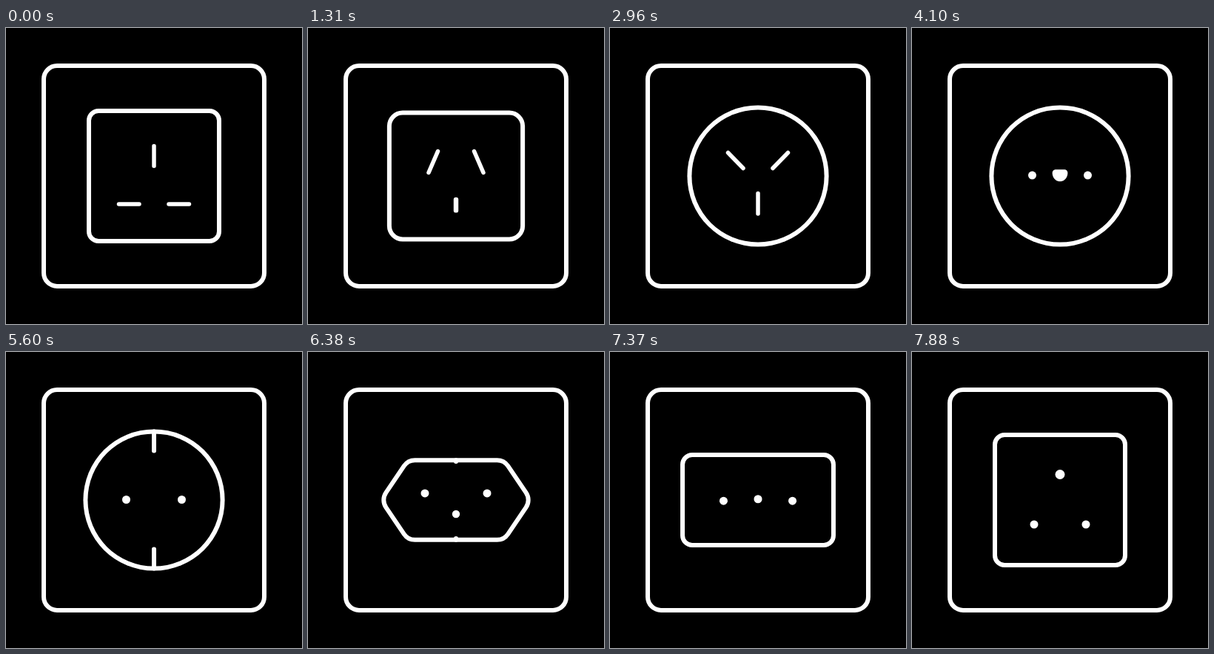
Write an HTML page with a canvas that moves like this. It is 400 by 400 pixels and loops after 8000 ms.

```html
<!DOCTYPE html>
<html lang="en">
<head>
<meta charset="utf-8">
<title>Wall sockets</title>
<style>
  html, body { margin: 0; width: 100%; height: 100%; overflow: hidden; background: #000; }
  canvas { display: block; }
</style>
</head>
<body>
<canvas id="stage" width="400" height="400"></canvas>
<script>
const ctx = document.getElementById('stage').getContext('2d');
const LOOP = 8000, MORPH = 590, TICK = 30, LINE = 6, BLADE = 5.5, HOLE = 11;

// Faces: half width, half height and half tip width of a hexagon core, then the rounding around it.
const rect = (w, h, r) => [w - r, h - r, w - r, r];
const square = rect(88, 88, 13);
const wide = rect(102.5, 71, 47);
const slab = rect(102.5, 60, 13);
const hex = [59, 38.5, 85, 13];
const round = [0.1, 0.1, 0.1, 92.5];

// Left pin (the right one mirrors it): two ends and a thickness.
const blade = (x1, y1, x2, y2) => [x1, y1, x2, y2, BLADE];
const hole = (x, y) => [x, y, x, y, HOLE];

// Earth contact: top, bottom, thickness, half width.
const slot = (y1, y2) => [y1, y2, BLADE, 0];
const dot = (y, w = HOLE) => [y, y, w, 0];

const sides = hole(162.5, 199.5);
const pose = (start, face, pin, earth, clip = 0) => ({ start, parts: [face, pin, earth, [clip]] });

const poses = [
  pose(-MORPH, square, blade(180, 238, 152.5, 238), slot(159.5, 186.5)),
  pose(490, square, blade(176.6, 166.5, 162, 195.5), slot(231.5, 248.5)),
  pose(1150, wide, blade(169, 167, 169, 195), dot(234, 12)),
  pose(1765, wide, blade(169, 185, 169, 214), dot(234, 0)),
  pose(2380, round, blade(159.5, 168.5, 180, 189.5), slot(223.5, 251)),
  pose(3090, round, hole(162.5, 198.5), [244, 261, BLADE, 14]),
  pose(3785, round, sides, dot(158.5)),
  pose(4490, round, sides, dot(158.5, 0)),
  pose(5190, round, sides, dot(219, 0), 32),
  pose(5890, hex, hole(157.7, 190.4), dot(219)),
  pose(6590, slab, hole(153, 200), dot(200)),
  pose(7290, square, hole(165, 233), dot(165.5, 13))
];

const ease = u => u < 0.5 ? 2 * u * u : 1 - 2 * (1 - u) ** 2;
const mix = (a, b, k) => a.map((v, i) => v + (b[i] - v) * k);

function shape(points, width, color, closed) {
  if (width < 0.05) return;
  ctx.beginPath();
  points.forEach(([x, y]) => ctx.lineTo(x, y));
  if (closed) ctx.closePath();
  ctx.lineWidth = width;
  ctx.strokeStyle = ctx.fillStyle = color;
  ctx.fill();
  ctx.stroke();
}

const line = (x1, y1, x2, y2, w) => shape([[x1, y1], [x2, y2 + 0.02]], w, '#fff');

function drawFace([w, h, tip, r]) {
  const core = [[-w, -h], [w, -h], [tip, 0], [w, h], [-w, h], [-tip, 0]]
    .map(([x, y]) => [200 + x, 200 + y]);
  shape(core, 2 * r + LINE, '#fff', true);
  shape(core, 2 * r - LINE, '#000', true);
}

function drawEarth([top, bottom, w, half]) {
  if (half < 0.05) return line(200, top, 200, bottom, w);
  const arc = Array.from({ length: 25 }, (_, i) => {
    const a = Math.PI * i / 24;
    return [200 + half * Math.cos(a), top + (bottom - top) * Math.sin(a)];
  });
  shape(arc, w, '#fff', true);
}

function draw(time) {
  const t = time - (time + 10) % TICK;
  const i = poses.findLastIndex(p => t >= p.start);
  const k = ease(Math.min(1, Math.max(0, (t - poses[i].start) / MORPH)));
  const from = poses[Math.max(0, i - 1)].parts;
  const [face, pin, earth, [clip]] = poses[i].parts.map((part, n) => mix(from[n], part, k));

  ctx.fillStyle = '#000';
  ctx.fillRect(0, 0, 400, 400);
  ctx.lineCap = ctx.lineJoin = 'round';
  ctx.lineWidth = LINE;
  ctx.strokeStyle = '#fff';
  ctx.beginPath();
  ctx.roundRect(51, 51, 298, 298, 18);
  ctx.stroke();

  drawFace(face);
  const [x1, y1, x2, y2, w] = pin;
  line(x1, y1, x2, y2, w);
  line(400 - x1, y1, 400 - x2, y2, w);
  drawEarth(earth);
  if (clip > 0.05) {
    const edge = face[1] + face[3];
    line(200, 200 - edge, 200, 200 - edge + clip, LINE);
    line(200, 200 + edge, 200, 200 + edge - clip, LINE);
  }
}

const begin = performance.now();
function frame() {
  draw((performance.now() - begin) % LOOP);
  requestAnimationFrame(frame);
}
frame();
</script>
</body>
</html>
```
